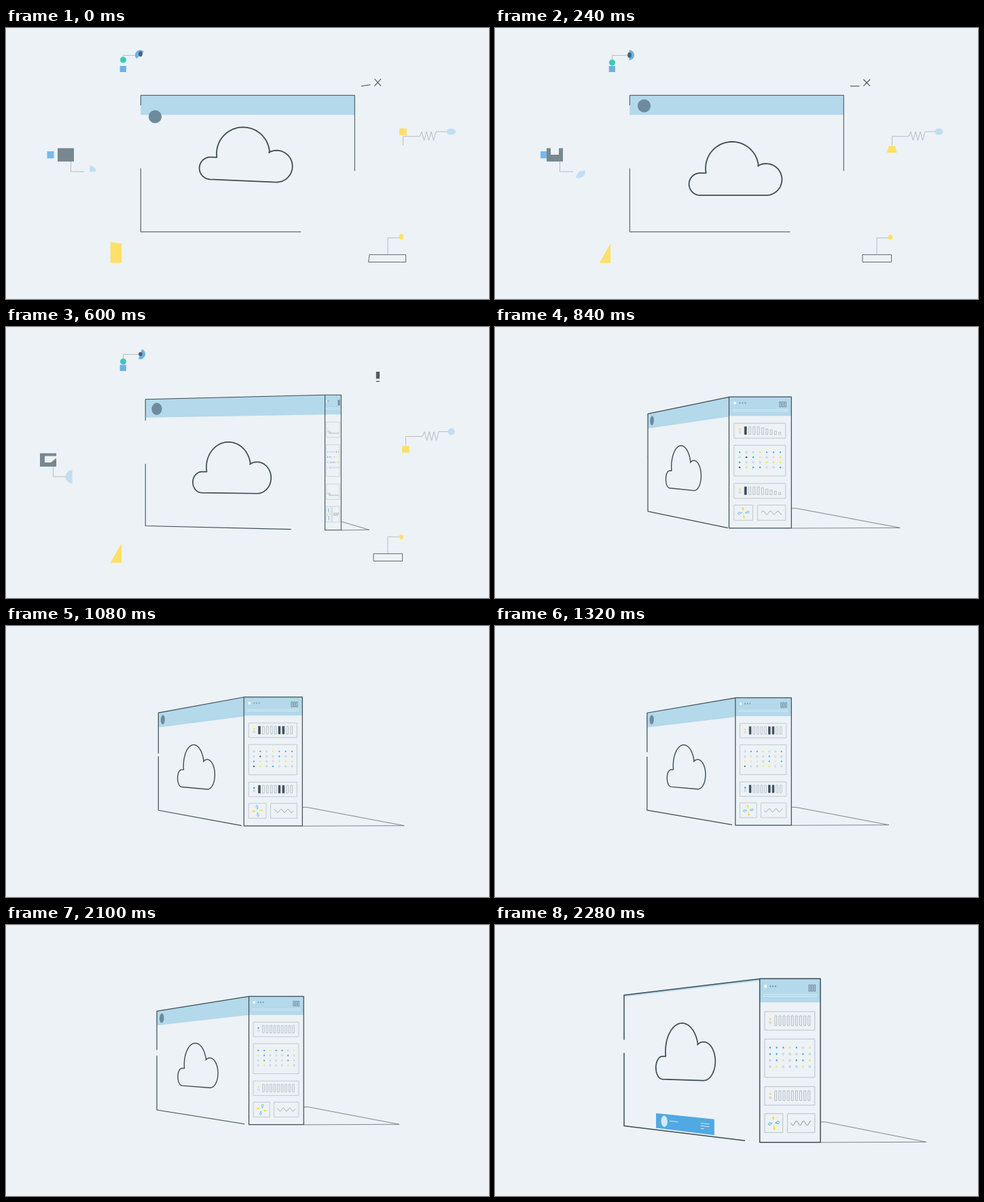
Write an HTML page with a canvas that moves like this. It is 711 by 400 pixels and loops after 2340 ms.

```html
<!DOCTYPE html>
<html lang="en">
<head>
<meta charset="utf-8">
<title>Cloud box</title>
<style>
  html, body { margin: 0; width: 100%; height: 100%; overflow: hidden; background: #ecf2f6; }
  canvas { display: block; }
</style>
</head>
<body>
<canvas id="stage" width="711" height="400"></canvas>
<script>
const ctx = document.getElementById('stage').getContext('2d');
const LOOP = 2340, STEP = 60;
const INK = '#3d4c56', THIN = '#b3bec6', SKY = '#b3d9ea', BLUE = '#6cb2e3', PALE = '#c1def1',
      YELLOW = '#ffe067', TEAL = '#3fcab5', GREY = '#788790', PAPER = '#ecf2f6', CARD = '#51a9e3';

const clamp = x => Math.max(0, Math.min(1, x));
const lerp = (a, b, k) => a + (b - a) * k;
const mix = (from, to, k) => from.map((v, i) => lerp(v, to[i], k));
const progress = (t, from, to) => clamp((t - from) / (to - from));
const smooth = x => x * x * (3 - 2 * x);
const easeOut = (x, power) => 1 - (1 - x) ** power;
const hash = n => { const s = Math.sin(n * 12.9898) * 43758.5453; return s - Math.floor(s); };
const rad = degrees => degrees * Math.PI / 180;
const range = (n, fn) => Array.from({ length: n }, (_, i) => fn(i));

function paint(fill, stroke, width = 1) {
  if (fill) { ctx.fillStyle = fill; ctx.fill(); }
  if (stroke) { ctx.strokeStyle = stroke; ctx.lineWidth = width; ctx.stroke(); }
}
function shape(points, fill, stroke, width) {
  ctx.beginPath();
  points.forEach(p => ctx.lineTo(...p));
  ctx.closePath();
  paint(fill, stroke, width);
}
function line(points, color = THIN, width = 1) {
  ctx.beginPath();
  points.forEach(p => ctx.lineTo(...p));
  paint(null, color, width);
}
function box(x, y, w, h, fill, stroke, width) {
  ctx.beginPath();
  ctx.rect(x, y, w, h);
  paint(fill, stroke, width);
}
function oval(x, y, rx, ry, fill, stroke, width) {
  ctx.beginPath();
  ctx.ellipse(x, y, rx, ry, 0, 0, 7);
  paint(fill, stroke, width);
}
function slice(x, y, r, from, to, fill) {
  ctx.beginPath();
  ctx.moveTo(x, y);
  ctx.arc(x, y, r, rad(from), rad(to));
  paint(fill);
}
function shifted(dx, dy, fn) {
  ctx.save();
  ctx.translate(dx, dy);
  fn();
  ctx.restore();
}
const arc = (cx, cy, r, from, to) => range(41, i => {
  const a = rad(lerp(from, to, i / 40));
  return [cx + r * Math.cos(a), cy + r * Math.sin(a)];
});

// the right lobe swells as the box turns
function cloudPoints(turn, tilt, lift) {
  const lobe = 23.4 + 2.6 * turn;
  return [...arc(302, 230.5, 16.4, 90, 270), ...arc(349, 207, 39, 169.6, 355.5 - 8.5 * turn),
          ...arc(399, 247 - lobe, lobe, 239, 450)].map(([x, y]) => [
    349 + (x - 349) * Math.cos(tilt) - (y - 207) * Math.sin(tilt),
    207 + (x - 349) * Math.sin(tilt) + (y - 207) * Math.cos(tilt) + lift]);
}

// left x, left half height, seam x, seam half height, right x
const FLAT = [198.3, 100.8, 513.3, 100.8, 513.3];
const TURNED = [225, 72, 344.5, 96.8, 436.3];
const SETTLED = [223.6, 71.8, 356, 93.4, 436.3];
const NEAR = [190, 96.5, 389.7, 120.7, 479];

function drawBox(t) {
  const turn = smooth(progress(t, 480, 840));
  const settle = easeOut(progress(t, 840, 1800), 2.4);
  const zoom = progress(t, 2000, 2280) ** 3;
  const [xL, hL, xS, hS, xR] = mix(mix(mix(FLAT, TURNED, turn), SETTLED, settle), NEAR, zoom);
  const depth = xR - xS;

  const at = (s, v) => [lerp(xL, xS, s), 200.1 + lerp(hL, hS, s) * (2 * v - 1)];
  // perspective mapping of flat window coordinates onto the turning face
  const face = ([x, y]) => {
    const u = (x - 198.3) / 315;
    return at(u * hL / ((1 - u) * hS + u * hL), (y - 99.4) / 201.5);
  };
  const onFace = points => points.map(face);
  const edge = 1 + .2 * turn + .3 * zoom;
  const drop = (1 - progress(t, 0, 240)) ** 2;
  const reveal = progress(t, 2160, 2280);

  const header = lerp(.143 + .007 * turn, .012, zoom);
  shape([at(0, 0), at(1, 0), at(1, header), at(0, header)], SKY);
  if (!reveal) shape(onFace(arc(219.5, 115 + 16 * drop, 9.5, 0, 360)), '#6d8b9c');

  const lift = 1.5 * turn - 21.5 * (drop + zoom);
  shape(onFace(cloudPoints(turn, .042 * drop, lift)), null, INK, 1.8 - .4 * turn + .3 * zoom);

  if (reveal) {
    const y = lerp(298.5, 276.8, reveal);
    shape(onFace([[286, y], [423, y + .8], [423, 298.6], [286, 298.2]]), CARD);
    if (reveal === 1) {
      shape(onFace(arc(307, 287.3, 8, 0, 360)), '#d5eaf8');
      const rule = (x, y, w) => line(onFace([[x, y], [x + w, y]]), '#e4f1fa', .9);
      rule(320, 286, 21);
      for (let i = 0; i < 3; i++) rule(393, 284.7 + i * 3.5, i < 2 ? 19 : 8);
    }
  }

  // the gaps in the outline follow the depth of the box
  line([at(0, .074 + .004 * depth - .09 * zoom), at(0, 0), at(1, 0)], INK, edge);
  line([at(0, .535 - .00105 * depth), at(0, 1), at(.749 + .0026 * depth - .09 * zoom, 1)], INK, edge);
  if (!turn) return line([at(1, 0), at(1, .554)], INK, edge);

  const ground = 200 + hS, floor = 200 + .94 * hL;
  line([[xR, floor], [xR + .08 * depth, floor], [xR + 1.742 * depth, ground - .4], [xR, ground + .2]], '#5f6c75', .8);
  ctx.save();
  ctx.translate(xS, 200 - hS);
  ctx.scale(depth / 92, hS / 97);
  drawPanel(t);
  ctx.restore();
  box(xS, 200 - hS, depth, 2 * hS, null, INK, edge);
}

const LAMP = { b: '#4aa3e0', y: '#ffdc4a', d: '#465a6e' };

// every lamp picks a new random colour at its own moment; "o" is an unlit ring
function lamp(t, x, y, choices, seed, r = 1.2) {
  const turnNo = Math.floor(t / 480 + hash(seed));
  const color = LAMP[choices[Math.floor(hash(seed * 7 + turnNo * 3.7) * choices.length)]];
  oval(x, y, r, r, color, color ? null : THIN, .7);
}

function meter(t, y, seed) {
  box(7.5, y, 76, 22, null, THIN, .8);
  lamp(t, 16, y + 8.8, 'yyyb', seed, 1.4);
  lamp(t, 16, y + 13.2, 'oooy', seed + 1, 1.4);
  const threshold = 1.05 - .45 * Math.sin((t - 780) / 960 * Math.PI);
  for (let i = 0; i < 9; i++) {
    const h = lerp(1, 11.5, progress(t, 540 + i * 32, 740 + i * 32));
    const lit = Math.cos(2 * Math.PI * i / 5.6) > threshold;
    box(22.8 + i * 6.3, y + 16.5 - h, 3, h, lit ? INK : null, lit ? INK : '#a3afb8', .7);
  }
}

function drawPanel(t) {
  box(0, 0, 92, 194, PAPER);
  box(0, 0, 92, 28, SKY);
  oval(8.6, 9, 2, 2, '#fff');
  for (let i = 0; i < 3; i++) {
    oval(16 + i * 4, 9, 1.1, 1.1, '#8399a6');
    box(74.5 + i * 3.8, 7.3, 2.2, 7.5, null, '#6a7e8b', .8);
  }
  box(6, 18.8, 80, 2.3, null, '#e9f5fa', .6);

  meter(t, 39, 50);
  box(7.5, 71.5, 76, 45.5, null, THIN, .8);
  for (let i = 0; i < 28; i++)
    lamp(t, 15.7 + i % 7 * 10, 81.8 + Math.floor(i / 7) * 7.5, 'ooooobbbyyyd', i + 1);
  meter(t, 128, 60);

  box(7.5, 160, 27.5, 22.5, null, THIN, .8);
  box(42, 160, 41.5, 22.5, null, THIN, .8);
  const beat = (t - 840) / 480 * Math.PI;
  shifted(21.3, 171.3, () => {
    ctx.rotate(beat - .1);
    for (let i = 0; i < 4; i++) {
      const blade = [[.3, -2.5], [-1.8, -6.5], [-.6, -8.6], [1.3, -7]];
      if (i % 2) shape(blade, null, '#5db0e6', .8);
      else shape(blade, '#ffd83d');
      ctx.rotate(Math.PI / 2);
    }
  });
  line(range(61, i => [47.5 + i / 2, 171.3 - 2.4 * Math.sin(i / 60 * 5.5 * Math.PI + beat)]), '#8d9aa4', .9);
}

function drawDecor(t) {
  if (t >= 840) return;
  const start = progress(t, 0, 240), late = progress(t, 240, 600), morph = progress(t, 0, 540);
  const early = Math.max(0, (t - 540) / 60), out = Math.max(0, (t - 600) / 60) ** 3 * 10;

  // top: lamp and spinning half disc
  shifted(0, -out, () => {
    const y = lerp(47, 51, start), spin = lerp(-225, -90, start) + 20 * late;
    line([[172.5, y], [172.5, 40.4], [lerp(190, 196, start), 40.4]]);
    oval(172.5, y, 4.6, 4.6, TEAL);
    box(167.7, 56, 9.2, 9, BLUE);
    slice(197.5, 40, 7.6, spin, spin + 180, BLUE);
    oval(198, lerp(38.3, 40, start), 2.9, lerp(4, 3, late), '#4f6274');
  });

  // left: block being cut out
  shifted(-26 * early ** 2, 9 * early ** 2, () => {
    if (t < 420) box(lerp(60.5, 67, start) + 9 * late, 182, 10, 10.4, '#79b9e8');
    line([[95.5, 197], [95.5, 212], [115, 212]]);
    box(76, 177.4, 24, 19.7, GREY);
    if (t < 420) box(82, 177, 12, 10 * start, PAPER);
    else shape([[83, 181.4], [100, 181.4], [100, 184.4], [92, 191], [83, 191]], PAPER);
    slice(123.5, 212, 9 + morph, -90 + 180 * morph, 270 * morph, PALE);
  });

  // right: spring
  shifted(4 * early ** 3, 1.5 * early, () => {
    const zigzag = range(7, i => [612 + i * 3.5, i % 2 ? 166 : 153]);
    line([[584.5, 173], [584.5, 160], [609, 160], ...zigzag, [648, 153]]);
    const y = lerp(148.3, 174, start), flare = 2 * Math.sin(Math.PI * morph);
    shape([[579 + flare / 2, y], [589.7 - flare / 2, y], [589.7 + flare, y + 10], [579 - flare, y + 10]], YELLOW);
    oval(lerp(655.2, 651.5, morph), 153, lerp(6.9, 5, morph), lerp(4.6, 5, morph), PALE);
  });

  // bottom: collapsing corner and tray
  shifted(0, out, () => {
    const dy = 1.2 * late, grow = 1 - start;
    shape([[153.7, lerp(316, 346.7, start) + dy], [170, 318 + dy], [170, 346.7 + dy], [153.7, 346.7 + dy]], YELLOW);
    line([[562, 335], [562, 309.8], [579, 309.8]]);
    oval(582, lerp(308, 309.8, morph), 3.3, lerp(4.2, 3.3, morph), YELLOW);
    shape([[541 - 6 * grow, 334.6], [583.6 + 5 * grow, 334.6], [583.6 + 5 * grow, 345.5], [541 - 7.5 * grow, 345.5]],
      null, '#5d6a73');
  });

  // window buttons
  if (t < 600) {
    const tilt = 2 * (1 - start);
    line([[523, 85.8], [536.5, 85.8 - tilt]], INK, 1.1);
    line([[542.5, 76 - tilt / 2], [552, 85.7]], INK, 1.1);
    line([[552, 76 - tilt / 2], [542.5, 85.7]], INK, 1.1);
  } else if (t < 660) {
    box(544.8, 66, 5.2, 10.3, '#4b5b67');
    line([[544.8, 80.3], [550, 80.3]], INK, 1.2);
  }
}

ctx.lineJoin = 'round';
function frame(now) {
  const t = Math.floor(now % LOOP / STEP) * STEP;
  ctx.fillStyle = PAPER;
  ctx.fillRect(0, 0, 711, 400);
  drawDecor(t);
  drawBox(t);
  requestAnimationFrame(frame);
}
requestAnimationFrame(frame);
</script>
</body>
</html>
```
